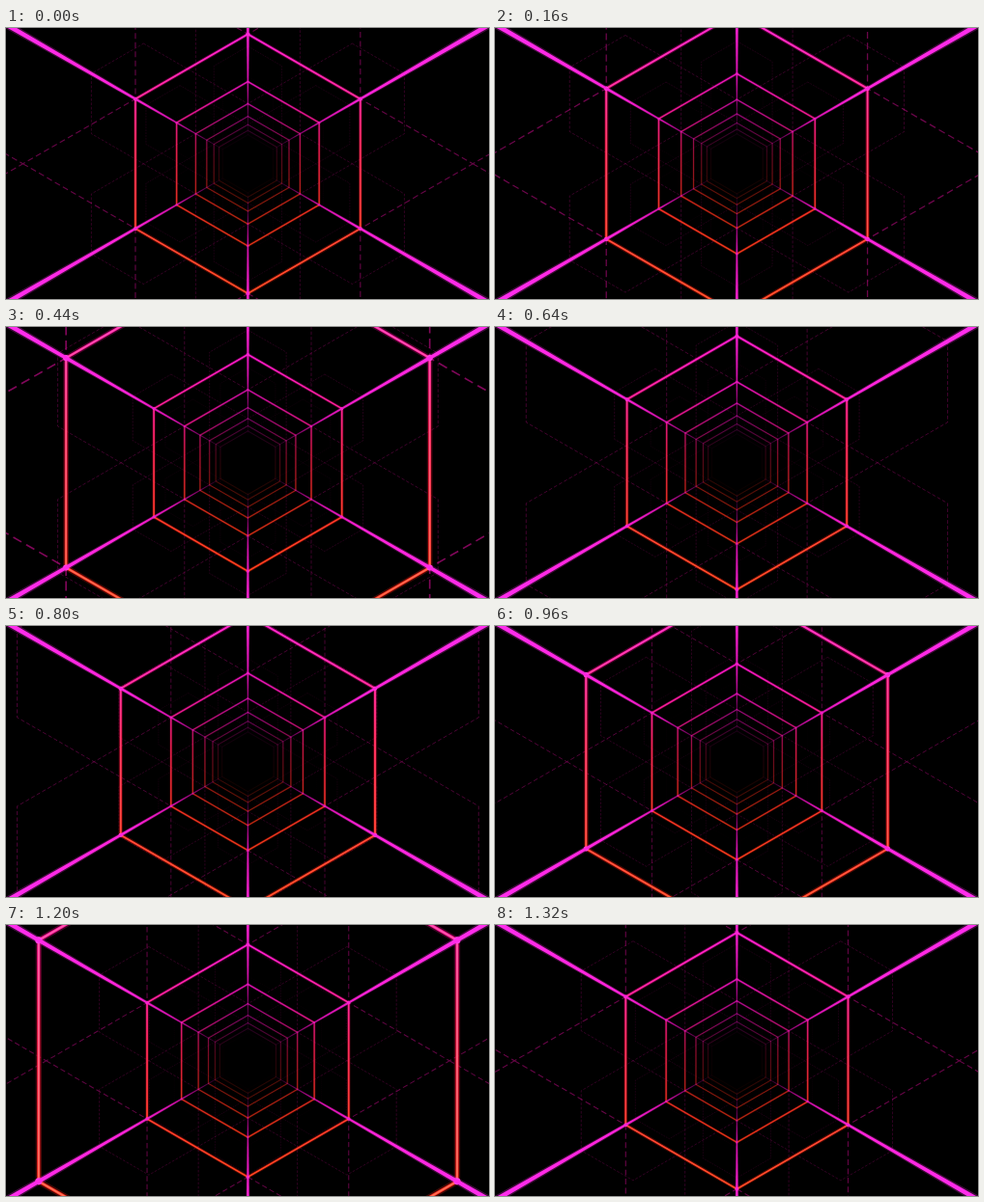
These frames come from a looping animation (500 by 281 pixels, 1.36 s). An HTML page:

```html
<!DOCTYPE html>
<html lang="en">
<head>
<meta charset="utf-8">
<title>Hexagon tunnel</title>
<style>
  html, body { margin: 0; width: 100%; height: 100%; overflow: hidden; background: #000; }
  svg { display: block; width: 100%; height: 100%; }
</style>
</head>
<body>
<svg id="stage" viewBox="0 0 500 281" xmlns="http://www.w3.org/2000/svg">
  <defs>
    <linearGradient id="edge" x1="0" y1="0" x2="0" y2="1">
      <stop offset="0" stop-color="#f808c4"/>
      <stop offset=".25" stop-color="#fc0c8c"/>
      <stop offset=".42" stop-color="#ff1048"/>
      <stop offset=".75" stop-color="#ff2418"/>
      <stop offset="1" stop-color="#ff2c10"/>
    </linearGradient>
    <linearGradient id="core" x1="0" y1="0" x2="0" y2="1">
      <stop offset="0" stop-color="#ff4ce4"/>
      <stop offset=".3" stop-color="#ff5ca0"/>
      <stop offset=".75" stop-color="#ff7058"/>
      <stop offset="1" stop-color="#ff7440"/>
    </linearGradient>
    <radialGradient id="beam" gradientUnits="userSpaceOnUse" cx="0" cy="0" r="290">
      <stop offset=".1" stop-color="#c000a0" stop-opacity="0"/>
      <stop offset=".16" stop-color="#cc04a4" stop-opacity=".32"/>
      <stop offset=".22" stop-color="#d808ac" stop-opacity=".6"/>
      <stop offset=".31" stop-color="#ec12c0" stop-opacity=".87"/>
      <stop offset=".48" stop-color="#ff22d8"/>
      <stop offset="1" stop-color="#ff2eee"/>
    </radialGradient>
  </defs>
  <rect width="500" height="281" fill="#000"/>
  <g id="scene" transform="translate(250.4 140.8)" fill="none"></g>
</svg>
<script>
const LOOP = 1360, STEP = 40;
const RING_MS = 2000 / 3;   // time to travel one ring
const FOCAL = 232.6;        // ring radius at depth 1
const START = 1.73, FIRST = -1, LAST = 9;

const scene = document.getElementById('scene');

function add(parent, tag, attrs) {
  const el = document.createElementNS('http://www.w3.org/2000/svg', tag);
  for (const name in attrs) el.setAttribute(name, attrs[name]);
  parent.appendChild(el);
  return el;
}

// Six points at distance r, the first one straight up.
function corners(r) {
  return Array.from({ length: 6 }, (_, i) => {
    const a = (i * 60 - 90) * Math.PI / 180;
    return [r * Math.cos(a), r * Math.sin(a)];
  });
}

function hexPath(cx, cy) {
  return 'M' + corners(1).map(([x, y]) => (cx + x).toFixed(4) + ' ' + (cy + y).toFixed(4)).join('L') + 'Z';
}

// Every ring is drawn at radius 1 and scaled by its depth.
function makeRing(k) {
  const g = add(scene, 'g', {});
  const dashes = k % 2 === 0 && add(g, 'path', {
    d: corners(2).map(c => hexPath(...c)).join(''),
    stroke: '#d40c94', 'stroke-dasharray': '.045 .026'
  });
  const solid = add(g, 'g', { 'stroke-linejoin': 'round' });
  const line = color => add(solid, 'path', { d: hexPath(0, 0), stroke: `url(#${color})` });
  const glow = line('edge'), edge = line('edge'), core = line('core');
  glow.setAttribute('stroke-opacity', .25);
  const dots = add(g, 'g', { fill: '#ff48ea' });
  for (const [cx, cy] of corners(1)) add(dots, 'circle', { cx, cy, r: .014 });
  return { k, g, dashes, solid, glow, edge, core, dots };
}

const rings = [];
for (let k = LAST; k >= FIRST; k--) rings.push(makeRing(k));

for (let i = 0; i < 6; i++) {
  const beam = half => `M0 0L${half} -300L${-half} -300Z`;
  const g = add(scene, 'g', { transform: `rotate(${i * 60})`, fill: 'url(#beam)' });
  add(g, 'path', { d: beam(4.2), 'fill-opacity': .25 });
  add(g, 'path', { d: beam(2.5) });
}

const clamp = v => Math.max(0, Math.min(1, v));

function draw(ms) {
  const t = Math.floor((ms % LOOP + 1) / STEP) * STEP % LOOP;
  for (const { k, g, dashes, solid, glow, edge, core, dots } of rings) {
    const z = START + k - t / RING_MS;
    if (z < .6) {
      g.setAttribute('display', 'none');
      continue;
    }
    const R = FOCAL / z, light = clamp((8 - z) / 6);
    const width = .011 + .45 / R;
    g.setAttribute('display', 'inline');
    g.setAttribute('transform', `scale(${R})`);
    solid.setAttribute('opacity', light);
    glow.setAttribute('stroke-width', width * 2);
    edge.setAttribute('stroke-width', width);
    core.setAttribute('stroke-width', width * .55);
    core.setAttribute('stroke-opacity', clamp(1 / z));
    dots.setAttribute('opacity', light * clamp(1.5 / z));
    if (dashes) {
      dashes.setAttribute('stroke-width', .006 + .35 / R);
      dashes.setAttribute('opacity', .62 / Math.sqrt(z) * clamp((9 - z) / 4));
    }
  }
}

const begin = performance.now();
function tick() {
  draw(performance.now() - begin);
  requestAnimationFrame(tick);
}
draw(0);
requestAnimationFrame(tick);
</script>
</body>
</html>
```
